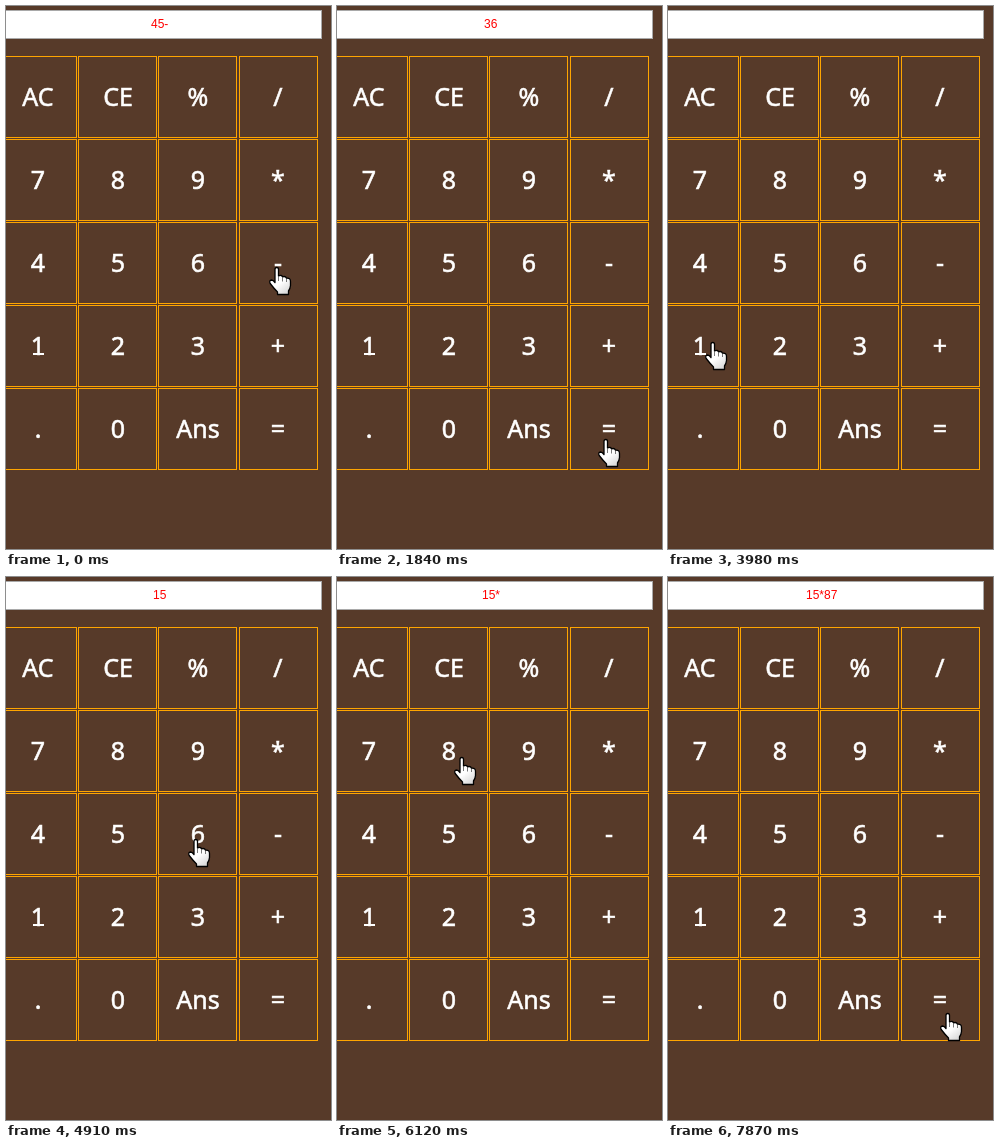
These frames come from a looping animation (325 px wide and 543 px high, 7.99 s). An HTML page with a canvas:

```html
<!DOCTYPE html>
<html lang="en">
<head>
<meta charset="utf-8">
<title>Calculator</title>
<style>
html, body { margin: 0; width: 100%; height: 100%; overflow: hidden; background: #573a29; }
canvas { display: block; width: 325px; height: 543px; }
</style>
</head>
<body>
<canvas id="stage" width="325" height="543"></canvas>
<script>
const ctx = document.getElementById('stage').getContext('2d');
const LOOP = 7990, TICK = 135;
const BROWN = '#573a29', ORANGE = '#ffa500';

const KEYS = ['AC CE % /', '7 8 9 *', '4 5 6 -', '1 2 3 +', '. 0 Ans ='].map(row => row.split(' '));
const COL_PITCH = 80.33, ROW_PITCH = 83, KEY_H = 82;

// The pointer travels to (x, y) from leave to rest, bowed sideways; key is pressed at press
const START = { x: 262, y: 261, text: '45-' };
const VISITS = [
  { leave: -10, rest: 510, x: 186, y: 196, bow: -0.4, key: '9', press: 790 },
  { leave: 790, rest: 1840, x: 260, y: 433, bow: -0.2, key: '=', press: 1700 },
  { leave: 1840, rest: 2620, x: 36, y: 99, bow: -0.1, key: 'AC', press: 2900 },
  { leave: 2900, rest: 3590, x: 55, y: 409, bow: 0.05 },
  { leave: 3590, rest: 3980, x: 36, y: 336, bow: -0.1, key: '1', press: 4250 },
  { leave: 4250, rest: 4770, x: 118, y: 261, bow: 0, key: '5', press: 4770 },
  { leave: 4770, rest: 5190, x: 268, y: 185, bow: 0.2, key: '*', press: 5340 },
  { leave: 5340, rest: 6120, x: 116, y: 180, bow: -0.18 },
  { leave: 6120, rest: 6390, x: 109, y: 180, bow: 0, key: '8', press: 6670 },
  { leave: 6670, rest: 6910, x: 43, y: 180, bow: 0, key: '7', press: 7190 },
  { leave: 7190, rest: 7600, x: 296, y: 400, bow: 0 },
  { leave: 7600, rest: 7870, x: 271, y: 436, bow: 0 }
];

const HAND = new Path2D('M6 2.5Q6 .5 7.8 .5Q9.5 .5 9.5 2.5V9Q12.7 7.6 13.5 9.8Q16.6 8.8 17.5 11.3' +
  'Q21.5 10.7 21.5 14.5V18.5Q21.2 21.6 19.5 24V27.5H8.5V25Q5 21.5 1.2 16.5Q-.2 13.7 2.3 13Q4.4 13 6 15.6Z');
const KNUCKLES = new Path2D('M9.5 9V14M13.5 10V14.5M17.5 11.5V15');

function evaluate(text) {
  const [, a, op, b] = text.match(/(\d+)([-*])(\d+)/);
  return String(op === '-' ? a - b : a * b);
}

function pressKey(text, key) {
  if (key === 'AC') return '';
  return key === '=' ? evaluate(text) : text + key;
}

function displayAt(t) {
  return VISITS.filter(v => v.key && v.press <= t).reduce((text, v) => pressKey(text, v.key), START.text);
}

function pointerAt(t) {
  const i = VISITS.findLastIndex(v => v.leave <= t);
  const to = VISITS[i], from = VISITS[i - 1] || START;
  const span = to.rest - to.leave;
  const steps = Math.round(span / TICK);
  const u = Math.min(1, Math.floor((t - to.leave) / span * steps + 0.001) / steps);
  const dx = to.x - from.x, dy = to.y - from.y;
  const side = to.bow * Math.sin(Math.PI * u);
  return [Math.round(from.x + dx * u - dy * side), Math.round(from.y + dy * u + dx * side)];
}

function drawKey(label, col, row) {
  const x = Math.round(-8.3 + col * COL_PITCH), y = 50 + row * ROW_PITCH;
  const cx = 32 + col * 80, base = y + 50;
  ctx.strokeStyle = ORANGE;
  ctx.lineWidth = 1;
  ctx.strokeRect(x + 0.5, y + 0.5, 78, KEY_H - 1);

  ctx.fillStyle = ctx.strokeStyle = '#fff';
  ctx.lineWidth = 0.6;
  ctx.font = '25px "Noto Sans", "Open Sans", sans-serif';
  ctx.textAlign = 'center';
  ctx.fillText(label, cx, base);
  ctx.strokeText(label, cx, base);
  if (label === '1') ctx.fillRect(cx - 5, base - 2, 11, 2);
}

function drawDisplay(text) {
  ctx.fillStyle = '#a9a9a9';
  ctx.fillRect(-8, 4, 324, 29);
  ctx.fillStyle = '#fff';
  ctx.fillRect(-8, 5, 323, 27);
  ctx.fillStyle = '#f00';
  ctx.font = '12px "Liberation Sans", Arial, sans-serif';
  ctx.textAlign = 'left';
  ctx.fillText(text, Math.round(154 - ctx.measureText(text).width / 2), 22);
}

function drawHand(x, y) {
  ctx.save();
  ctx.translate(x + 1, y);
  const shade = ctx.createLinearGradient(5, 8, 20, 28);
  shade.addColorStop(0.4, '#fff');
  shade.addColorStop(1, '#d0d0d0');
  ctx.fillStyle = shade;
  ctx.fill(HAND);
  ctx.lineJoin = 'round';
  ctx.lineWidth = 1.3;
  ctx.strokeStyle = '#000';
  ctx.stroke(HAND);
  ctx.lineWidth = 0.8;
  ctx.strokeStyle = '#555';
  ctx.stroke(KNUCKLES);
  ctx.restore();
}

function draw(t) {
  ctx.fillStyle = BROWN;
  ctx.fillRect(0, 0, 325, 543);
  drawDisplay(displayAt(t));
  KEYS.forEach((labels, row) => labels.forEach((label, col) => drawKey(label, col, row)));
  drawHand(...pointerAt(t));
}

const began = performance.now();
function tick() {
  draw((performance.now() - began) % LOOP);
  requestAnimationFrame(tick);
}
tick();
</script>
</body>
</html>
```
